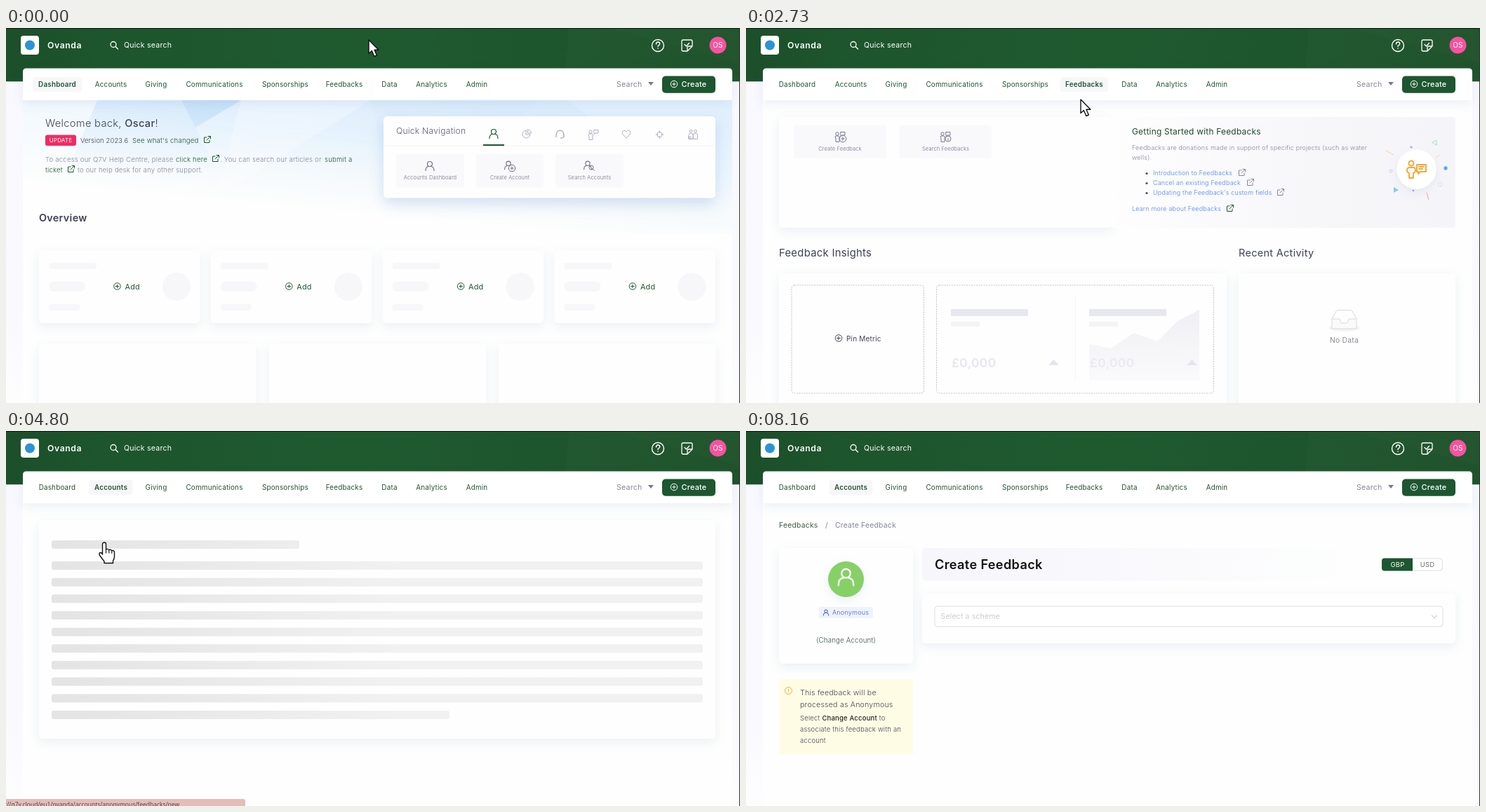
Animation of 1046x535 px, one loop 8560 ms. Source, as an HTML page:

```html
<!DOCTYPE html>
<html lang="en">
<head>
<meta charset="utf-8">
<title>Feedback walkthrough</title>
<style>
  html, body { margin: 0; width: 100%; height: 100%; overflow: hidden; background: #f9f9fe; }
  svg { display: block; width: 1046px; height: 535px; }
  text { font-family: Inter, "Open Sans", sans-serif; letter-spacing: .02em; white-space: pre; }
  .card { filter: drop-shadow(0 5px 7px rgba(70, 90, 170, .09)); }
  .lifted { filter: drop-shadow(0 8px 10px rgba(60, 110, 200, .2)); }
  .status { font-family: "Open Sans", sans-serif; letter-spacing: 0; }
</style>
</head>
<body>
<svg id="stage" viewBox="0 0 1046 535"></svg>
<script>
const LOOP = 8560;
const GREEN = '#1d5630', GREY = '#85859b', PALE = '#f7f7fa', INK = '#3f4254', BLUE = '#4a86f0';

// Markup helpers
const rect = (x, y, w, h, fill, r = 0, more = '') =>
  `<rect x="${x}" y="${y}" width="${w}" height="${h}" rx="${r}" fill="${fill}" ${more}/>`;
const card = (x, y, w, h, more = '') => rect(x, y, w, h, '#fefefe', 5, `class="card" ${more}`);
const text = (x, y, size, fill, str, weight = 400, more = '') =>
  `<text x="${x}" y="${y}" font-size="${size}" fill="${fill}" font-weight="${weight}" ${more}>${str}</text>`;
const mid = (x, y, size, fill, str, weight = 400, more = '') =>
  text(x, y, size, fill, str, weight, `text-anchor="middle" ${more}`);
const line = (d, color, width = 1, more = '') =>
  `<path d="${d}" fill="none" stroke="${color}" stroke-width="${width}" stroke-linecap="round" stroke-linejoin="round" ${more}/>`;
const shape = (d, fill, more = '') => `<path d="${d}" fill="${fill}" ${more}/>`;
const dot = (x, y, r, fill, more = '') => `<circle cx="${x}" cy="${y}" r="${r}" fill="${fill}" ${more}/>`;
const ring = (x, y, r, color, width = 1) => dot(x, y, r, 'none', `stroke="${color}" stroke-width="${width}"`);
const group = (id, body, more = '') => `<g id="${id}" ${more}>${body}</g>`;
const at = (x, y, body, scale = 1) => `<g transform="translate(${x} ${y}) scale(${scale})">${body}</g>`;

// Icons, each centred on its point
const plus = (x, y, color) => ring(x, y, 4.8, color) + line(`M${x - 2.3} ${y}h4.6M${x} ${y - 2.3}v4.6`, color);
const user = (x, y, color, scale = 1, width = 1.2) =>
  at(x, y, ring(0, -3, 3.5, color, width) + line('M-6 6.5Q-6 1-2 .5M6 6.5Q6 1 2 .5', color, width), scale);
const external = (x, y, color) =>
  line(`M${x - 1} ${y - 3}h-3.5v7.5h7.5v-3.5M${x + 1} ${y - 4.5}h3.5v3.5M${x + 4} ${y - 4}l-5 5`, color);
const chatter = (x, y, color, badge = '', scale = 1) => at(x, y,
  ring(-4, -4, 2.2, color) + line('M-6 7v-4q-2-4 0-4h4q2 0 1 4v4zM1-6.5h6v4.5h-4l-1.5 1.5z', color) + badge, scale);
const triangle = (x, y) => shape(`M${x} ${y + 8}l7.5-8 7.5 8z`, '#e5e5ee');

const tile = (x, y, w, label, icon, id = '') =>
  rect(x, y, w, 47.5, '#f9f9fc', 3, id && `id="${id}"`) + icon + mid(x + w / 2, y + 36, 7.5, '#6f6f86', label, 300);

function chrome() {
  return rect(0, 0, 1046, 535, 'url(#side)') + rect(0, 0, 1046, 76.3, 'url(#head)') +
    shape('M802 0H1046V76H795z', '#fff', 'opacity=".015"') + shape('M860 0H1046V50z', '#fff', 'opacity=".012"') +
    rect(24, 66, 1011, 480, '#fdfefd');
}

const tabs = [['Dashboard', 73, 70], ['Accounts', 149.5, 62], ['Giving', 214, 46], ['Communications', 297, 100],
  ['Sponsorships', 398, 80], ['Feedbacks', 482, 68], ['Data', 546.5, 40], ['Analytics', 606.5, 60], ['Admin', 671, 48]];

function topBar() {
  const nav = tabs.map(([label, x, w], i) =>
    rect(x - w / 2, 70, w, 21, PALE, 4, `id="pill${i}"`) + mid(x, 84, 9.9, GREEN, label, 400, `id="tab${i}"`)).join('');
  return rect(21, 11, 26, 27, '#fff', 4) + dot(34, 24.5, 7, '#2b93d8') +
    text(59, 28.5, 12.2, '#fff', 'Ovanda', 600, 'style="letter-spacing:.05em"') +
    ring(153, 23.5, 4, '#fff', 1.3) + line('M156 26.5l3.5 3.5', '#fff', 1.4) + text(168, 28, 10.6, '#fff', 'Quick search') +
    ring(929, 25, 8.5, '#fff', 1.4) + line('M926.5 23q0-3 2.6-3t2.6 2.6q0 1.8-2.6 2.7v1.2M929 29v.2', '#fff', 1.4) +
    line('M978 25v-6q0-2-2-2h-11q-2 0-2 2v12q0 2 2 2h6l7-7zM971 33v-5q0-2 2-2h5M967 23.500l2.500 2.500 4-4.500', '#fff', 1.3) +
    dot(1014.5, 24.5, 12, '#f653a0') + mid(1014.5, 28.2, 10, '#fff', 'OS') +
    shape('M24 103V62.500q0-5 5-5H1030q5 0 5 5V103z', '#fff', 'class="card"') + nav +
    text(870, 84, 10.6, GREY, 'Search') + shape('M915 77h8l-4 5z', '#77778d') +
    rect(935, 68.5, 76, 24.2, GREEN, 5) + plus(952, 80, '#fff') + text(962.5, 84, 10.9, '#fff', 'Create', 500);
}

function dashboard() {
  const sky = `<g mask="url(#fade)">${rect(24, 103, 1011, 190, '#dcedfc')}` +
    shape('M24 103H250L24 230z', '#edf6fe') + shape('M250 103H335L260 148z', '#bcdcf8') +
    shape('M130 103H250L300 200H90z', '#d0e7fb') + shape('M335 103H520L300 240z', '#e6f2fd') +
    shape('M520 103H760L560 290z', '#d9ebfb') + shape('M800 103H1035V280z', '#e2f0fd') + '</g>';
  const pen = '#b0b0c0';
  const person = (x, y) => ring(x, y - 5, 1.9, pen) + line(`M${x - 3} ${y + 6}v-5q0-3 3-3t3 3v5z`, pen);
  const icons = user(695, 151, GREEN) +
    line('M741 146a5.5 5.5 0 1 0 6 6h-6zM743.5 145v5h5a5 5 0 0 0-5-5', pen) +
    line('M784.5 152v-1a5 5 0 0 1 10 0v4q0 2-4 2M784 151.5v4M795 151.5v4', pen, 1.3) + chatter(837, 152, pen) +
    line('M884 157l-5-5.5q-2-4 1.5-5.5 2.5 0 3.5 2 1-2 3.5-2 3.5 1.5 1.5 5.5z', pen) +
    ring(931.5, 152, 3.7, pen) + line('M931.5 146.500v3M931.5 154.500v3M926 152h3M934 152h3', pen) +
    person(976, 152) + person(982.5, 152) + line('M973 155h3v3h-3z', pen);
  const stats = [0, 1, 2, 3].map(i => at(i * 244.8, 0, card(47, 317, 229.5, 104) +
    rect(61, 335, 68, 9, PALE, 4) + rect(61, 362, 52, 14, PALE, 7) + rect(61, 394, 44, 9, PALE, 4) +
    dot(243, 369, 20, PALE) + plus(158.5, 368.5, GREEN) + text(169.5, 372.5, 10.8, GREEN, 'Add'))).join('');
  const small = (x, y, str, fill = GREY) => text(x, y, 9.6, fill, str, 300);
  const pin = '#6f6f86';
  return sky + text(56, 141, 14.7, INK, 'Welcome back, <tspan font-weight="500">Oscar</tspan>!', 300) +
    rect(56, 152.5, 44, 15.5, '#ee2d62', 3) + mid(78, 163.3, 8, '#fff', 'UPDATE') +
    text(106, 164, 9.3, INK, 'Version 2023.6', 300) + small(180, 164, "See what's changed", GREEN) + external(287, 159, GREEN) +
    small(56, 191, 'To access our Q7V Help Centre, please') + small(242, 191, 'click here', GREEN) + external(299, 186, GREEN) +
    small(305, 191, '. You can search our articles or') + small(454, 191, 'submit a', GREEN) +
    small(56, 206, 'ticket', GREEN) + external(93, 201, GREEN) + small(102, 206, 'to our help desk for any other support.') +
    rect(538, 126, 473, 116.5, '#fefefe', 5, 'class="lifted"') + text(556, 151, 12.1, '#5b5b72', 'Quick Navigation', 300) +
    line('M538 168H1011', '#f3f3f6') + icons + rect(680, 166, 30, 2, GREEN) +
    tile(556, 180, 97, 'Accounts Dashboard', user(604, 197, pin)) +
    tile(670, 180, 96, 'Create Account', user(716, 196, pin, .9) + dot(721, 200, 4, '#f9f9fc') + plus(721, 200, pin)) +
    tile(783, 180, 97, 'Search Accounts', user(829, 196, pin, .9) + ring(834, 199, 3, pin) + line('M836 201l2.5 2.5', pin)) +
    text(47, 276, 14.4, INK, 'Overview', 600) + stats +
    [47, 375, 702].map(x => card(x, 450, 309.5, 100)).join('');
}

function feedbackPage() {
  const pin = '#77778d';
  const bar = (x, y, w) => rect(x, y, w, 11.5, '#f0f0f1', 3);
  const dashed = (x, y, w) => rect(x, y, w, 154, 'none', 4, 'stroke="#c2c2c8" stroke-dasharray="2 1.5"');
  const metric = (x, opacity) => rect(x, 401, 110, 10, '#e7e7ef') + rect(x, 419, 41, 7, '#f4f4f7') +
    text(x + 1, 484, 17.4, '#e6e6ed', '£0,000', 600, `opacity="${opacity}"`) + triangle(x + 139, 473);
  const guide = [['Introduction to Feedbacks', 707], ['Cancel an existing Feedback', 719], ["Updating the Feedback's custom fields", 762]]
    .map(([label, x], i) => dot(571, 207.5 + 14 * i, 1.6, '#4b4b60') + text(580, 210.3 + 14 * i, 9, BLUE, label, 300) +
      external(x, 206 + 14 * i, GREY)).join('');
  const confetti = line('M912 175l11 6M983 185l6-4', '#fbcf9d') + line('M970 235l3 10', '#f6a28d') +
    dot(948, 170, 1.8, '#b6b3ee') + dot(997, 200, 2.7, '#5aa9ee') + ring(989, 223, 3, '#d5e2f4') + ring(919, 204, 2, '#bfd6f5') +
    shape('M923 227l7 4-7 4z', '#7fcdf0') + line('M978 163l6-3v7z', '#a9dfb8') + dot(951, 232, 1.3, '#8fa5e8');
  const quick = card(47, 127, 474, 158, 'id="quickCard"') +
    tile(68, 138.5, 132, 'Create Feedback', chatter(134, 155, pin, plus(4, 3, pin)), 'createTile') +
    tile(219, 138.5, 131, 'Search Feedbacks', chatter(284, 155, pin, ring(4, 3, 4, pin) + line('M4 3v2', pin)));
  const loading = rect(521, 131, 490, 110, 'url(#panel)', 4) + bar(550, 155, 171) + bar(550, 184, 449) + bar(550, 208, 275);
  const intro = rect(521, 127, 490, 158, 'url(#panel)', 4) +
    text(550, 152, 11.9, '#1d4a2c', 'Getting Started with Feedbacks') +
    text(550, 174, 9, GREY, 'Feedbacks are donations made in support of specific projects (such as water', 300) +
    text(550, 187.5, 9, GREY, 'wells).', 300) + guide +
    text(550, 260.5, 9, BLUE, 'Learn more about Feedbacks', 300) + external(690, 257, GREEN) + confetti +
    dot(955.5, 201.5, 28.3, '#fff', 'class="card"') +
    at(955, 202, ring(-7, -9, 3.5, '#f7a634', 2) + line('M-10 12V5q-3-1-3-4 0-4 4-4h5q3 0 3 4 0 3-3 4v7zM1-7h13v10h-8l-3 3v-3H1zM4-4h7M4-1h5', '#f7a634', 1.9));
  const insights = text(47, 326, 14.8, INK, 'Feedback Insights') + text(702, 326, 14.5, INK, 'Recent Activity') +
    card(47, 350, 638, 220) + card(702, 350, 309, 220) + dashed(65, 367, 188.5) + dashed(271.5, 367, 395) +
    [65, 271.5, 478].map(x => dashed(x, 539, 188.5) + rect(x + 20.5, 572, 104, 10, '#ededf2')).join('') +
    plus(132, 442.5, '#44444f') + text(143, 447, 10, '#44444f', 'Pin Metric') + line('M469.5 384V502', '#f4f4f7') +
    shape('M489 451L520 457 553 435 586 447 615 418 646 402V503H489z', 'url(#area)') + metric(292, 1) + metric(489, .75);
  const empty = `<ellipse cx="852.5" cy="428" rx="22" ry="5" fill="#f3f3f4"/>` +
    line('M835 415l6-11q1-1.5 3-1.5h17q2 0 3 1.5l6 11', '#d9d9d9') +
    shape('M835 415h10q2 0 2 3t3 3h5q3 0 3-3t2-3h10v14H835z', '#fafafa', 'stroke="#d9d9d9"') +
    mid(852.5, 449, 10.4, '#8b8b93', 'No Data');
  const activity = bar(720, 379, 108) + bar(720, 408, 284) + bar(720, 432, 284) + bar(720, 455, 173);
  return group('quick', quick) + group('loading', loading) + group('intro', intro) +
    group('insights', insights + group('activity', activity) + group('empty', empty));
}

function skeletonPage() {
  const bars = [353, ...Array(9).fill(928), 567].map((w, i) => rect(65, i ? 162.4 + 23.65 * i : 156, w, 12, 'url(#shimmer)', 3));
  return card(47, 127, 964, 312) + bars.join('');
}

function formPage() {
  const note = (y, size, str) => text(77, y, size, '#44444f', str, 300);
  const bars = [0, 1, 2, 3, 4, 5, 6].map(i => rect(269, 250 + 24 * i, i < 6 ? 724 : 440, 11, '#f1f1f2', 3));
  const done = text(269, 197, 18.1, '#111', 'Create Feedback', 600) +
    rect(906.5, 182, 86, 17, '#fff', 4, 'stroke="#dedee2"') + shape('M950 181.5H910q-4 0-4 4v10q0 4 4 4H950z', GREEN) +
    mid(928.5, 194, 9.5, '#fff', 'GBP') + mid(971, 194, 9.5, '#6f6f78', 'USD') +
    rect(269, 250, 724, 29, '#fff', 4, 'stroke="#dedede"') + text(277.5, 268, 10.6, '#bdbdc4', 'Select a scheme', 300) +
    line('M977.5 263l3.5 4 3.5-4', '#bdbdc2');
  return text(47, 138, 10.4, '#3d5f4a', 'Feedbacks') + text(113, 138, 10.4, GREY, '/') + text(127, 138, 10.4, GREY, 'Create Feedback') +
    card(47, 167, 191, 165) + dot(142.5, 211.5, 25.5, '#87d068', 'class="card"') + user(142.5, 208.5, '#fff', 1.8, 1.3) +
    rect(104, 251, 77, 16, '#eef2fd', 3) + user(114, 259, '#3550b5', .62, 1.6) + text(123, 262.3, 9.1, '#4a62bd', 'Anonymous', 300) +
    mid(142.5, 302, 9.7, '#34513f', '(Change Account)', 300) +
    rect(47, 354, 191, 107, '#fffce6') + ring(60.5, 370.5, 5, '#f5ad1d') + line('M60.5 368v3M60.5 373v.1', '#f5ad1d') +
    note(377, 10.6, 'This feedback will be') + note(394, 10.6, 'processed as Anonymous') +
    note(413, 9.5, 'Select <tspan font-weight="500" fill="#222">Change Account</tspan> to') +
    note(429, 9.5, 'associate this feedback with an') + note(445, 9.5, 'account') +
    rect(251, 167, 610, 46.5, 'url(#banner)', 5) + card(251, 232, 760, 71, 'id="formCard"') +
    group('formBars', bars.slice(0, 3).join('')) + group('formTail', bars.slice(3).join('')) + group('formDone', done);
}

const gradient = (id, stops, more = '') => `<linearGradient id="${id}" ${more}>` +
  stops.map(([o, c]) => `<stop offset="${o}" stop-color="${c}"/>`).join('') + '</linearGradient>';
const down = 'x2="0" y2="1"';
const userSpace = 'gradientUnits="userSpaceOnUse"';
const defs = gradient('head', [[0, '#1c4f2a'], [.12, '#1d552c'], [.5, '#1f5a2f'], [1, '#1c5029']]) +
  gradient('side', [[0, '#f8f8fe'], [.7, '#f9f9fe'], [1, '#fdfdfe']], down) +
  gradient('panel', [[0, '#fefefe'], [.3, '#fafafc'], [.7, '#f6f6f9'], [1, '#f5f5f9']]) +
  gradient('area', [[0, '#f0f0f4'], [1, '#fafafc']], down) +
  gradient('banner', [[0, '#f6f6fb'], [.6, '#fafafd'], [1, '#fdfefd']]) +
  gradient('shimmer', [[0, '#f1f1f1'], [.5, '#e4e4e4'], [1, '#f1f1f1']], `${userSpace} x1="-400" x2="560"`) +
  gradient('fadeRamp', [[0, '#fff'], [.35, '#bbb'], [.7, '#444'], [1, '#000']], `${userSpace} x1="530" y1="90" x2="514" y2="265"`) +
  `<mask id="fade">${rect(24, 103, 1011, 190, 'url(#fadeRamp)')}</mask>`;

const outline = 'stroke="#111" stroke-width="1.4" stroke-linejoin="round"';
const arrow = shape('M0 0V19.5L4.3 15.5 7.8 23.5 11.3 22 8 14.2H14z', '#fff', outline);
const hand = shape('M-2.5 17V2.5a2.5 2.5 0 0 1 5 0V10q2-1.5 4.3.7 2.3-1.2 4 .9 3.7-.6 3.7 2.9V20q0 4-2 6v3.5H0V27Q-4 22-7 17.5-7.5 14-4.5 14.5z', '#fff', outline) +
  line('M2.5 10v5M6.8 11v4M10.8 12v3.5', '#111', 1.1);

const stage = document.getElementById('stage');
stage.innerHTML = `<defs>${defs}</defs>` + chrome() + group('dashboard', dashboard()) + group('feedback', feedbackPage()) +
  group('skeleton', skeletonPage()) + group('form', formPage()) + topBar() +
  group('status', shape('M0 525H0z', '#e4bdba', 'id="statusBox"') +
    text(0, 535.5, 8.5, '#4d3c3c', '', 400, 'id="statusText" class="status" text-anchor="end"')) +
  rect(0, 0, 1046, 1, '#0e1d12') + rect(1045, 0, 1, 535, '#30343a') +
  group('cursor', group('arrow', arrow) + group('hand', hand));

const parts = Object.fromEntries([...stage.querySelectorAll('[id]')].map(el => [el.id, el]));
const set = (id, attrs) => Object.entries(attrs).forEach(([key, value]) => parts[id].setAttribute(key, value));
const show = (id, opacity) => set(id, { opacity, display: opacity > 0 ? 'inline' : 'none' });
const ramp = (t, from, to) => Math.min(1, Math.max(0, (t - from) / (to - from)));
const ease = p => p * p * (3 - 2 * p);
const within = (t, from, to) => t >= from && t < to;

// Pointer stops: time, x, y
const stops = [[0, 517, 17], [500, 517, 17], [880, 545, 72], [1330, 488, 84], [2700, 488, 84], [2730, 477, 102],
  [3560, 136, 188], [3630, 136, 182], [4060, 140, 159], [5870, 140, 159], [6360, 386, 297], [6480, 386, 297],
  [6840, 65, 352], [7100, 150, 146], [7330, 263, 168], [7360, 264, 166], [7720, 310, 80], [8130, 300, -30], [LOOP, 300, -30]];

function pointer(t) {
  const i = stops.findIndex(stop => stop[0] > t);
  const [t0, x0, y0] = stops[i - 1], [t1, x1, y1] = stops[i];
  const p = ease(ramp(t, t0, t1));
  return [x0 + (x1 - x0) * p, y0 + (y1 - y0) * p];
}

function drawTabs(t) {
  const active = t < 1630 ? 0 : t < 4500 ? 5 : 1;
  const hovered = within(t, 800, 1080) ? 6 : within(t, 1080, 2730) ? 5 : -1;
  const switching = within(t, 1630, 1900);
  tabs.forEach((_, i) => {
    show('pill' + i, i === active || i === hovered ? 1 : 0);
    const weight = switching && (i === 0 || i === 5) ? 500 : i === active ? 600 : 400;
    set('tab' + i, { 'font-weight': weight });
  });
}

function drawStatus(t) {
  const second = t > 3000;
  const width = second ? 253 + 88 * ease(ramp(t, 4500, 4700)) : 146;
  show('status', second ? ramp(t, 4180, 4300) * (t < 4930) : ramp(t, 1180, 1360) * (t < 1960));
  set('statusBox', { d: `M0 525H${width - 3}q3 0 3 3V535H0z` });
  set('statusText', { x: second ? 247 : 141 });
  parts.statusText.textContent = '://q7v.cloud/eu1/ovanda/' + (second ? 'accounts/anonymous/feedbacks/new' : 'feedbacks');
}

function draw(t) {
  show('dashboard', t < 1630 ? 1 : 0);
  show('feedback', within(t, 1630, 4500) ? .3 + .7 * ramp(t, 1600, 1780) : 0);
  show('skeleton', within(t, 4500, 4900) ? .3 + .7 * ramp(t, 4480, 4640) : 0);
  show('form', t >= 4900 ? .5 + .5 * ramp(t, 4880, 4960) : 0);

  const loaded = t >= 1930;
  show('loading', loaded ? 0 : 1);
  show('activity', loaded ? 0 : 1);
  show('intro', loaded ? ramp(t, 1900, 2030) : 0);
  show('empty', loaded ? 1 : 0);
  const slide = 12 * (1 - ease(ramp(t, 1630, 1930)));
  set('quick', { transform: `translate(0 ${loaded ? 0 : slide})` });
  set('quickCard', { height: loaded ? 158 : 110 });
  set('insights', { transform: `translate(0 ${loaded ? 0 : -44})` });
  const press = ramp(t, 3400, 3640);
  set('createTile', { fill: `rgb(${249 - 33 * press} ${249 - 25 * press} ${252 - 34 * press})` });

  set('shimmer', { gradientTransform: `translate(${(t - 4800) * 1.2} 0)` });
  const ready = t >= 5660;
  const shrink = ease(ramp(t, 5180, 5330));
  set('formCard', { height: ready ? 71 : 200 - 96 * shrink });
  show('formBars', ready ? 0 : 1);
  show('formTail', 1 - shrink);
  show('formDone', ready ? 1 : 0);

  drawTabs(t);
  drawStatus(t);
  const pointing = within(t, 800, 2715) || within(t, 3400, 5900);
  show('hand', pointing ? 1 : 0);
  show('arrow', pointing ? 0 : 1);
  set('cursor', { transform: `translate(${pointer(t).join(' ')})` });
}

function tick() {
  draw(performance.now() % LOOP);
  requestAnimationFrame(tick);
}
tick();
</script>
</body>
</html>
```
